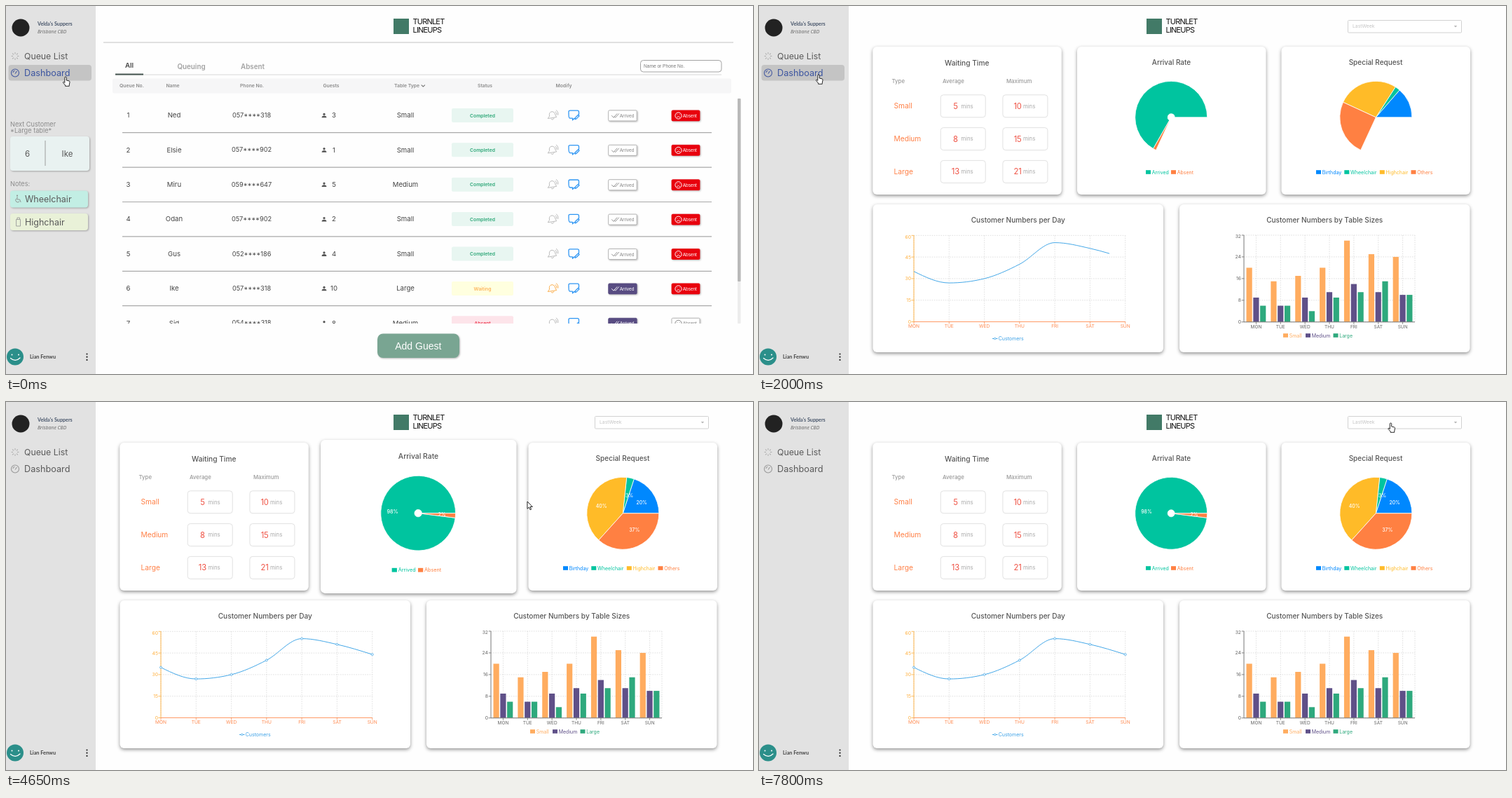
Recreate the animation shown at these times as an HTML page. Size 1066 by 525 pixels, loop 8000 ms.

```html
<!DOCTYPE html>
<html lang="en">
<head>
<meta charset="utf-8">
<title>Queue dashboard</title>
<style>
html, body { margin: 0; width: 100%; height: 100%; overflow: hidden; background: #fefefe; }
svg { display: block; width: 100vw; height: 100vh; font-family: Inter, "Open Sans", sans-serif; }
.lato { font-family: Lato, sans-serif; }
.arial { font-family: "Liberation Sans", Arial, sans-serif; }
.card { fill: #fff; filter: drop-shadow(0 2.2px 2.6px rgba(0,0,0,.42)); }
.soft { filter: drop-shadow(1px 1.5px 1px rgba(0,0,0,.28)); }
.grid { stroke: #ccc; stroke-width: .6; stroke-dasharray: 1.6 1.6; fill: none; }
</style>
</head>
<body>
<svg id="stage" viewBox="0 0 1066 525" xmlns="http://www.w3.org/2000/svg"></svg>
<script>
const LOOP = 8000;
const TEAL = '#00c49f', BLUE = '#0088fe', GOLD = '#ffbb28', ORANGE = '#ff8042';
const DAYS = ['MON', 'TUE', 'WED', 'THU', 'FRI', 'SAT', 'SUN'];

// ---------- drawing helpers ----------
const text = (x, y, s, size, fill, more = '') =>
  `<text x="${x}" y="${y + size * .36}" font-size="${size}" fill="${fill}" ${more}>${s}</text>`;
const mid = (x, y, s, size, fill, more = '') => text(x, y, s, size, fill, 'text-anchor="middle" ' + more);
const rect = (x, y, w, h, r, fill, more = '') =>
  `<rect x="${x}" y="${y}" width="${w}" height="${h}" rx="${r}" fill="${fill}" ${more}/>`;
const line = (x1, y1, x2, y2, more) => `<path d="M${x1} ${y1}L${x2} ${y2}" ${more}/>`;
const stroke = (d, color, w = 1) =>
  `<path d="${d}" fill="none" stroke="${color}" stroke-width="${w}" stroke-linejoin="round" stroke-linecap="round"/>`;
const circle = (x, y, r, fill, more = '') => `<circle cx="${x}" cy="${y}" r="${r}" fill="${fill}" ${more}/>`;
const at = (x, y, body) => `<g transform="translate(${x} ${y})">${body}</g>`;
const group = (id, body, more = '') => `<g id="${id}" ${more}>${body}</g>`;
const bold = 'font-weight="600"', medium = 'font-weight="500"';
const key = (x, y, s, color) => rect(x, y - 2.8, 7, 5.6, 0, color) + text(x + 8.7, y, s, 7, color);

// ---------- sidebar and header ----------
function sidebar() {
  let spokes = '';
  for (let i = 0; i < 8; i++)
    spokes += `<path d="M0-3V-5.4" stroke="#aaa" transform="rotate(${i * 45})"/>`;
  return rect(0, 0, 128, 525, 0, '#e2e2e2') + circle(21, 31, 12.5, '#222') +
    text(45, 25.5, "Velda's Suppers", 7.2, '#48566b', 'class="lato" font-weight="700"') +
    text(45, 36.5, 'Brisbane CBD', 6.9, '#666', 'font-style="italic" style="font-family:\'Open Sans\',sans-serif"') +
    at(13, 71.5, spokes) + text(26, 71.5, 'Queue List', 12.3, '#5a5a5a') +
    group('hot', rect(3.5, 84, 118.5, 22.5, 4, '#c4c4c4')) +
    group('dash', circle(13, 95.5, 5.5, 'none') + '<path d="M13 96.5L15.5 93M10 95A3.4 3.4 0 0 1 12.5 92.3" fill="none"/>', 'stroke-width="1.1"') +
    group('dashText', text(26, 95.5, 'Dashboard', 12.7, 'inherit')) +
    group('next', nextCustomer()) +
    circle(13, 500.5, 12, '#2b8f8a') + circle(8.5, 497.5, 1, '#fff') + circle(18, 497.5, 1, '#fff') +
    stroke('M6.5 502.5Q13.5 508.5 20 502', '#fff', 1.2) +
    text(34, 500.5, 'Lian Fenwu', 7.3, '#444', 'class="lato" font-weight="700"') +
    [496.5, 500.7, 504.9].map(y => circle(115.5, y, 1.1, '#222')).join('');
}

function nextCustomer() {
  return text(6, 168.5, 'Next Customer', 9.2, '#8b8b8b') + text(6, 178, '*Large table*', 9.2, '#8b8b8b') +
    rect(6, 186, 113, 49, 4, '#e9f2f1', 'class="soft"') + line(56, 192, 56, 228, 'stroke="#888" stroke-width=".8"') +
    mid(30.5, 210.5, '6', 11.5, '#555') + mid(87.5, 210.5, 'Ike', 11.5, '#555') +
    text(6, 254, 'Notes:', 9.2, '#8b8b8b') +
    rect(6, 263.5, 111, 24, 4, '#c2eee4', 'class="soft"') + text(27, 275.5, 'Wheelchair', 12.5, '#5a5a5a') +
    rect(6, 296, 111, 24, 4, '#e9f1d8', 'class="soft"') + text(27, 308.5, 'Highchair', 12.5, '#5a5a5a') +
    circle(16, 270.5, 1, '#888') + stroke('M16 272.5V276H19.5L21 279.5M14.5 275A3 3 0 1 0 19 279', '#888', .9) +
    stroke('M15 304.5H20.5V314H15ZM16 304V302H19.5V304', '#999', .9);
}

const header = () => rect(553, 18, 22, 22, 0, '#427a67') +
  text(580.5, 22.5, 'TURNLET', 11, '#111', 'letter-spacing="-.8"') +
  text(580.5, 34, 'LINEUPS', 11, '#111', 'letter-spacing="-.8"') +
  group('picker', rect(840.5, 20.5, 162, 17.5, 1, '#fff', 'stroke="#d2d2d2"') +
    text(847, 28.7, 'LastWeek', 6.8, '#c4c4c4') + '<path d="M991.8 28H996.2L994 30.6Z" fill="#b5b5b5"/>');

// ---------- queue page ----------
function row(i, [name, phone, guests, size, state]) {
  const done = state === 'Completed', away = state === 'Absent';
  const [back, ink] = done ? ['#e8f6f1', '#2fa879'] : away ? ['#fde4ea', '#ee4055'] : ['#ffffdf', '#fdb35a'];
  const bell = !done && !away ? '#fba63c' : '#b5b5b5';
  const go = done ? '#888' : '#fff', off = away ? '#888' : '#fff';
  return at(0, 155.7 + 49.4 * i,
    mid(174.5, 0, i + 1, 9.6, '#444') + mid(240, 0, name, 9.6, '#444') + mid(350.5, 0, phone, 9.2, '#444') +
    circle(454, -1.4, 1.6, '#555') + '<path d="M450.6 3.6Q450.6.8 454 .8T457.4 3.6Z" fill="#555"/>' +
    mid(468, 0, guests, 9.6, '#444') + mid(570, 0, size, 9.6, '#444') +
    rect(636, -9.8, 88, 20, 2, back) + mid(680, .5, state, 6.8, ink, bold) +
    stroke('M773.5 4.5L775.5 1.5Q774.5-4.5 779-5Q783-5 784 0L785.5 2.5ZM778 5.5Q780 8 782 4.5M784-5Q786-3.5 786-.5M785.5-7Q788.5-4.5 788-.5', bell, .9) +
    stroke('M811 4.5L808.5 7V4.5H805Q803 4.5 803-1.5V-5Q803-6.5 805-6.5H815.5Q817.5-6.5 817.5-4.5V-1M812 6L812.6 3.4L816.6-.4L818 1.2L814 5.2Z', '#2f96f3', 1.3) +
    rect(859.7, -6.8, 40.5, 15, 1.5, done ? '#fff' : '#584c82', `class="soft" stroke="${done ? '#a5a5a5' : '#584c82'}" stroke-width=".8"`) +
    stroke('M864.5 .8L867 3.5L872-2M868.5 2.4L869.6 3.5L874.6-2', go, .9) + text(875.7, 1, 'Arrived', 6.5, go, 'class="arial"') +
    rect(950, -6.8, 40, 15, 1.5, away ? '#fff' : '#e8000d', `class="soft" stroke="${away ? '#a5a5a5' : '#e8000d'}" stroke-width=".8"`) +
    circle(959.5, .8, 4.6, 'none', `stroke="${off}"`) + stroke('M957.3 3Q959.5 .4 961.7 3M957.8-.8V-.7M961.2-.8V-.7', off, .9) +
    text(965.7, 1, 'Absent', 6.5, off, 'class="arial"') +
    line(166, 25, 1007, 25, 'stroke="#a9a9a9" stroke-width="1.2"'));
}

function queuePage() {
  const guests = [
    ['Ned', '057****318', 3, 'Small', 'Completed'], ['Elsie', '057****902', 1, 'Small', 'Completed'],
    ['Miru', '059****647', 5, 'Medium', 'Completed'], ['Odan', '057****902', 2, 'Small', 'Completed'],
    ['Gus', '052****186', 4, 'Small', 'Completed'], ['Ike', '057****318', 10, 'Large', 'Waiting'],
    ['Sid', '054****318', 8, 'Medium', 'Absent']];
  const heads = { 'Queue No.': 179.5, Name: 238, 'Phone No.': 351, Guests: 464, 'Table Type': 572, Status: 683.5, Modify: 796 };
  return line(139, 52, 1038, 52, 'stroke="#e0e0e0" stroke-width="1.8"') +
    line(156, 98, 1021, 98, 'stroke="#e4e4e4" stroke-width="1.4"') + line(156, 97.5, 196, 97.5, 'stroke="#44544f" stroke-width="2"') +
    mid(176, 84.5, 'All', 9.6, '#444', bold) + mid(264.5, 86, 'Queuing', 9.8, '#a2a2a2', bold) + mid(352, 86, 'Absent', 9.8, '#a2a2a2', bold) +
    rect(905.5, 77.5, 115.5, 16.5, 4, '#fff', 'stroke="#999" stroke-width=".9"') + text(910, 85.7, 'Name or Phone No.', 6.6, '#777', 'class="arial"') +
    rect(152, 103.5, 883, 21, 2, '#f6f6f7') +
    Object.entries(heads).map(([s, x]) => mid(x, 113.7, s, 6.8, '#8b8b8b', bold)).join('') +
    stroke('M593 112.8L595.3 115L597.6 112.8', '#777', 1.1) +
    `<g clip-path="url(#list)">${guests.map((g, i) => row(i, g)).join('')}</g>` +
    rect(1044, 132, 4.5, 321, 1, '#ececec') + rect(1044, 132, 4.5, 261, 1, '#b9b9b9') +
    rect(530, 467.5, 117, 34.5, 8, '#79a592', 'class="soft"') + mid(588.3, 484.7, 'Add Guest', 14, '#fff', 'class="arial"');
}

// ---------- dashboard ----------
const topCard = (id, x, body) => group(id, rect(x, 58, 269.5, 211, 6, '#fff', 'class="card"') + body);

function waiting() {
  const rows = [['Small', 5, 10], ['Medium', 8, 15], ['Large', 13, 21]];
  const box = (x, y, n) => rect(x, y - 16, 64, 32, 4, '#fff', 'stroke="#dedede" stroke-width=".9"') +
    mid(x + 21.2, y, n, 11.2, '#ef5345', 'letter-spacing="-.2"') + text(x + 29, y, 'mins', 7.8, '#aaa');
  return mid(296.7, 81.3, 'Waiting Time', 10.2, '#555', medium) +
    text(189.5, 107.3, 'Type', 7.8, '#999', medium) + text(262, 107.3, 'Average', 7.8, '#999', medium) + text(353, 107.3, 'Maximum', 7.8, '#999', medium) +
    rows.map(([s, a, b], i) => {
      const y = 142.8 + 46.8 * i;
      return text(192.5, y, s, 10.2, '#ff7f45') + box(259.2, y, a) + box(347.9, y, b);
    }).join('');
}

// Monotone cubic through evenly spaced points.
function monotone(pts) {
  const dx = pts[1][0] - pts[0][0], n = pts.length;
  const s = pts.slice(1).map((p, i) => (p[1] - pts[i][1]) / dx);
  const m = pts.map((p, i) => {
    if (!i || i === n - 1) return 0;
    const a = s[i - 1], b = s[i];
    return (Math.sign(a) + Math.sign(b)) * Math.min(Math.abs(a), Math.abs(b), Math.abs(a + b) / 4);
  });
  m[0] = (3 * s[0] - m[1]) / 2;
  m[n - 1] = (3 * s[n - 2] - m[n - 2]) / 2;
  let d = `M${pts[0]}`;
  for (let i = 1; i < n; i++) {
    const [a, b] = pts[i - 1], [x, y] = pts[i];
    d += `C${a + dx / 3} ${b + m[i - 1] * dx / 3} ${x - dx / 3} ${y - m[i] * dx / 3} ${x} ${y}`;
  }
  return d;
}

function lineChart() {
  const x = i => 221 + 50.28 * i, y = v => 450.5 - 2.053 * v, right = x(6);
  const pts = [35, 27, 30, 40, 55, 51, 44].map((v, i) => [x(i), y(v)]);
  let out = rect(162.5, 283, 414.5, 211, 6, '#fff', 'class="card"') + mid(369.8, 305.5, 'Customer Numbers per Day', 10.1, '#555', medium);
  for (let v = 0; v <= 60; v += 15)
    out += line(221, y(v), right, y(v), 'class="grid"') + line(217.5, y(v), 221, y(v), 'stroke="#ffb74f" stroke-width=".9"') +
      text(217, v === 60 ? 329.5 : y(v), v, 6.8, '#ffb040', 'text-anchor="end"');
  DAYS.forEach((d, i) => {
    out += line(x(i), 327.3, x(i), 450.5, 'class="grid"') + line(x(i), 450.5, x(i), 453.5, 'stroke="#ff9a66" stroke-width=".9"') +
      mid(x(i), 457, d, 6.6, '#ff8a50');
  });
  return out + line(221, 327.3, 221, 450.5, 'stroke="#ffb74f"') + line(221, 450.5, right, 450.5, 'stroke="#ff9a66"') +
    `<path id="curve" d="${monotone(pts)}" pathLength="1" fill="none" stroke="#45a8e8"/>` +
    group('dots', pts.map(p => circle(p[0], p[1], 1.5, '#fff', 'stroke="#45a8e8" stroke-width=".8"')).join('')) +
    line(333, 474.5, 340.5, 474.5, 'stroke="#45a8e8"') + circle(336.7, 474.5, 1.3, '#fff', 'stroke="#45a8e8" stroke-width=".8"') +
    text(341.7, 474.5, 'Customers', 7, '#3ba0e6');
}

function barChart() {
  const sets = [['Small', '#ffac5f', [20, 15, 17, 20, 30, 25, 24]], ['Medium', '#5f5088', [9, 6, 9, 11, 14, 11, 10]], ['Large', '#2ea97d', [6, 6, 4, 9, 11, 15, 10]]];
  const step = 34.86, y = v => 450.8 - 3.87 * v;
  let out = rect(600, 283, 414.5, 211, 6, '#fff', 'class="card"') + mid(807.2, 305.5, 'Customer Numbers by Table Sizes', 10.1, '#555', medium);
  for (let v = 0; v <= 32; v += 8)
    out += line(692, y(v), 936, y(v), 'class="grid"') + line(688.8, y(v), 692, y(v), 'stroke="#777" stroke-width=".9"') +
      text(688, v === 32 ? 329 : y(v), v, 6.8, '#666', 'text-anchor="end"');
  DAYS.forEach((d, i) => {
    const c = 692 + step * (i + .5);
    out += line(c, 327, c, 450.8, 'class="grid"') + line(c, 450.8, c, 453.8, 'stroke="#777" stroke-width=".9"') + mid(c, 457.3, d, 6.5, '#666');
  });
  out += line(936, 327, 936, 450.8, 'class="grid"');
  sets.forEach(([, color, vals], k) => vals.forEach((v, i) => {
    out += rect(695.5 + step * i + 9.8 * k, y(v), 8.2, 3.87 * v, 0, color);
  }));
  return out + line(692, 327, 692, 450.8, 'stroke="#777"') + line(692, 450.8, 936, 450.8, 'stroke="#777"') +
    key(748, 470, 'Small', sets[0][1]) + key(780, 470, 'Medium', sets[1][1]) + key(819.5, 470, 'Large', sets[2][1]);
}

const PIES = {
  pieA: { x: 588.2, parts: [[98, TEAL], [2, ORANGE]], hole: 5 },
  pieB: { x: 880.3, parts: [[20, BLUE], [10 / 3, TEAL], [40, GOLD], [110 / 3, ORANGE]], hole: 0 }
};

function pie({ x, parts, hole }, grow) {
  const R = 51.5, cy = 158.8, pt = (r, a) => `${x + r * Math.cos(a)} ${cy - r * Math.sin(a)}`;
  let a = 0, out = '';
  for (const [share, color] of parts) {
    const b = a + share / 50 * Math.PI * grow, big = b - a > Math.PI ? 1 : 0;
    out += `<path d="M${pt(hole, a)}L${pt(R, a)}A${R} ${R} 0 ${big} 0 ${pt(R, b)}L${pt(hole, b)}A${hole} ${hole} 0 ${big} 1 ${pt(hole, a)}Z" fill="${color}" stroke="#fff" stroke-width=".8"/>`;
    a = b;
  }
  return out;
}

const percent = (x, y, n) => mid(x, y, n + '%', 6.9, '#fff', medium);
const topRow = () => topCard('card0', 162.3, waiting()) +
  topCard('card1', 454, mid(588.5, 80.3, 'Arrival Rate', 10, '#555', medium) + group('pieA', '') +
    `<g class="label">${percent(553, 157, 98) + percent(621, 161, 2)}</g>` +
    key(552, 237, 'Arrived', TEAL) + key(588, 237, 'Absent', ORANGE)) +
  topCard('card2', 745.5, mid(880, 80.3, 'Special Request', 10, '#555', medium) + group('pieB', '') +
    `<g class="label">${percent(907.2, 143.7, 20) + percent(889.5, 134, 3) + percent(849.7, 148.3, 40) + percent(896.8, 182.5, 37)}</g>` +
    key(795, 237, 'Birthday', BLUE) + key(835.3, 237, 'Wheelchair', TEAL) + key(885.8, 237, 'Highchair', GOLD) + key(930.5, 237, 'Others', ORANGE));

// ---------- assemble ----------
const $ = id => document.getElementById(id);
const ink = 'stroke="#111" stroke-width=".9" stroke-linejoin="round" fill="#fff"';
$('stage').innerHTML = `<defs><clipPath id="list"><rect x="130" y="128" width="900" height="325"/></clipPath>
  <clipPath id="view"><rect width="1049" height="525"/></clipPath></defs>` +
  rect(0, 0, 1066, 525, 0, '#fefefe') + sidebar() + header() +
  `<g clip-path="url(#view)">${group('queue', queuePage()) + group('top', topRow()) + group('low', lineChart() + barChart())}</g>` +
  group('tip', rect(0, 0, 57, 25, 0, '#fff', 'stroke="#ccc" stroke-width=".8"') + mid(28.3, 12.7, 'Highchair : 60', 6.7, '#222')) +
  group('arrow', `<path d="M0 0V10.3L2.4 8.1L4 11.8L5.6 11.1L4 7.5H7.3Z" ${ink}/>`) +
  group('hand', `<path d="M-1.2 1.2A1.2 1.2 0 0 1 1.2 1.2V5L5 5.9Q6.2 6.3 6 7.7L5.2 12V13.3H-.4V12L-3.5 8.5Q-3.8 7-2.4 7.4L-1.2 8.5Z" ${ink}/>`);

// ---------- motion ----------
const clamp = v => Math.min(1, Math.max(0, v));
function bezier(x1, y1, x2, y2) {
  const f = (a, b, s) => 3 * (1 - s) * (1 - s) * s * a + 3 * (1 - s) * s * s * b + s * s * s;
  return x => {
    let lo = 0, hi = 1;
    for (let i = 0; i < 24; i++) {
      const s = (lo + hi) / 2;
      if (f(x1, x2, s) < x) lo = s; else hi = s;
    }
    return x <= 0 ? 0 : x >= 1 ? 1 : f(y1, y2, lo);
  };
}
const ease = bezier(.25, .1, .25, 1), inOut = bezier(.42, 0, .58, 1);
const run = (fn, t, start, dur) => fn(clamp((t - start) / dur));

// Bursts of screen updates: first, last, count.
const BURSTS = [[0, 0, 1], [130, 130, 1], [500, 860, 4], [1000, 1760, 7], [1890, 2000, 2], [2150, 2270, 2], [2410, 2510, 2],
  [2690, 2780, 2], [2930, 3170, 3], [3310, 3390, 2], [3530, 3910, 4], [4420, 4770, 4], [4910, 5150, 3], [5300, 5400, 2],
  [5560, 5560, 1], [5780, 5900, 2], [6060, 6290, 3], [6440, 6540, 2], [6790, 6790, 1], [6930, 7040, 2], [7190, 7300, 2],
  [7460, 7550, 2], [7690, 7800, 2]];
const TICKS = BURSTS.flatMap(([a, b, n]) =>
  Array.from({ length: n }, (_, i) => n > 1 ? Math.floor((a + (b - a) * i / (n - 1)) / 10) * 10 : a));

const POINTER = [[0, 85, 101], [129, 85, 101], [130, 85, 98], [2100, 85, 98], [2270, 91, 100], [2410, 112, 109], [2510, 141, 117],
  [2690, 183, 121], [2930, 240, 125], [3170, 335, 130], [3310, 425, 134], [3390, 455, 136], [3910, 665, 142], [4420, 690, 142],
  [4650, 744, 142], [4910, 810, 146], [5150, 863, 148], [5700, 863, 148], [5900, 868, 160], [6060, 872, 169], [6290, 876, 177],
  [6790, 877, 180], [6930, 882, 160], [7040, 890, 126], [7300, 904, 70], [7460, 903, 46], [7550, 902, 37], [7800, 901.5, 30]];
const TIP = [[6060, 861, 152], [6290, 882, 183], [6540, 886, 187]];

function along(keys, t) {
  const j = keys.findIndex(k => k[0] > t);
  if (j < 0) return keys[keys.length - 1].slice(1);
  if (!j) return keys[0].slice(1);
  const a = keys[j - 1], b = keys[j], u = (t - a[0]) / (b[0] - a[0]);
  return [1, 2].map(i => a[i] + (b[i] - a[i]) * u);
}

const HOVERS = [[297, 2690, 3310], [588.7, 3320, 4650], [880.2, 4645, 7440]];
const set = (id, attrs) => { for (const k in attrs) $(id).setAttribute(k, attrs[k]); };
const show = (id, on) => set(id, { display: on ? 'inline' : 'none' });
const shift = (x, y) => `translate(${x} ${y})`;

function draw(time) {
  const t = TICKS.filter(k => k <= time).pop();
  const left = t >= 500;

  const out = left ? run(inOut, t, 450, 550) : 0;
  show('queue', out < 1);
  set('queue', { opacity: 1 - out, transform: shift(-900 * out, 0) });
  show('next', !left);
  show('picker', left);

  [['top', 968], ['low', 988]].forEach(([id, start]) => {
    const p = run(inOut, t, start, 547);
    show(id, t >= 1000);
    set(id, { opacity: p ** .7, transform: shift(900 * (1 - p), 0) });
  });

  HOVERS.forEach(([cx, on, off], i) => {
    const s = 1 + .037 * (run(ease, t, on, 260) - run(ease, t, off, 260));
    set('card' + i, { transform: `translate(${cx} 163.5) scale(${s}) translate(${-cx} -163.5)` });
  });

  const grown = run(ease, t, 1384, 1544);
  for (const id in PIES) $(id).innerHTML = grown > 0 ? pie(PIES[id], grown) : '';
  document.querySelectorAll('.label').forEach(g => g.setAttribute('display', grown >= 1 ? 'inline' : 'none'));

  set('curve', { 'stroke-dasharray': run(ease, t, 995, 1500) + ' 2' });
  show('dots', t >= 2600);

  const hot = t < 2410;
  show('hot', hot);
  set('dash', { stroke: hot ? '#4459a0' : '#999', fill: 'none' });
  $('dashText').firstChild.setAttribute('fill', hot ? '#3c55a0' : '#5a5a5a');

  show('tip', t >= 5300 && t < 7040);
  set('tip', { transform: shift(...along(TIP, t)) });

  const hand = t < 2410 || t >= 7550, spot = shift(...along(POINTER, t));
  show('hand', hand);
  show('arrow', !hand);
  set('hand', { transform: spot });
  set('arrow', { transform: spot });
}

const begin = performance.now();
function frame() {
  draw((performance.now() - begin) % LOOP);
  requestAnimationFrame(frame);
}
frame();
</script>
</body>
</html>
```
